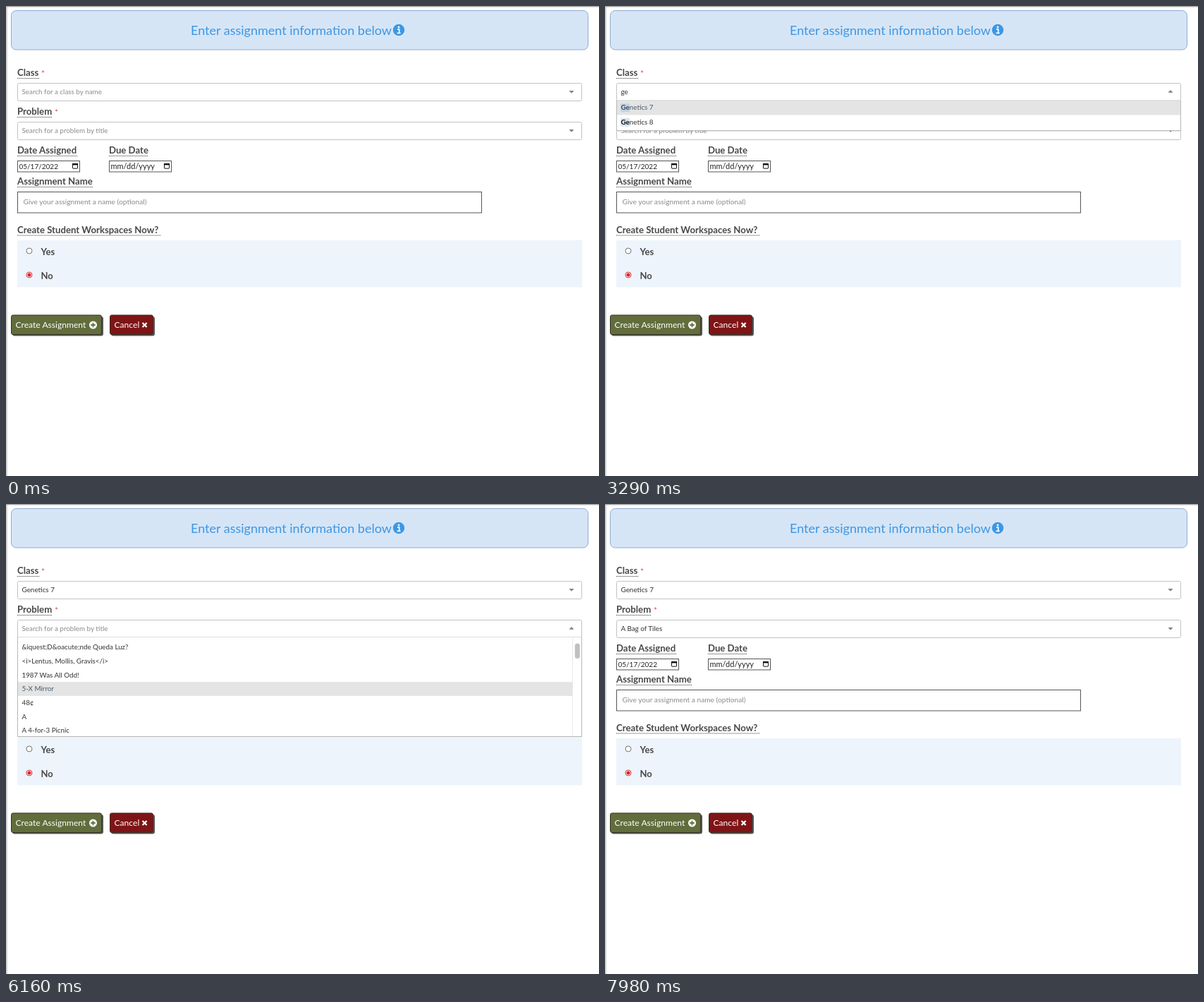
Write an HTML page that moves like this. It is 841 by 666 pixels and loops after 8000 ms.

```html
<!DOCTYPE html>
<html lang="en">
<head>
<meta charset="utf-8">
<title>Assignment form</title>
<style>
  html, body { margin: 0; width: 100%; height: 100%; overflow: hidden; background: #fff; }
  svg { display: block; }
  text { font-family: Lato, "Open Sans", sans-serif; white-space: pre; }
</style>
</head>
<body>
<svg id="stage" width="100%" height="100%" viewBox="0 0 841 666">
  <defs>
    <linearGradient id="top" x2="0" y2="1">
      <stop stop-color="#777"/><stop offset="1" stop-color="#fff" stop-opacity="0"/>
    </linearGradient>
    <linearGradient id="side">
      <stop stop-color="#b4b4b4"/><stop offset="1" stop-color="#fff" stop-opacity="0"/>
    </linearGradient>
  </defs>
  <g id="form"></g>
  <g id="live"></g>
</svg>
<script>
const LOOP = 8000, ROW = 19.65;
const INK = '#333', LABEL = '#484848', HINT = '#8a8a8a', BLUE = '#3c97e4';
const form = document.getElementById('form'), live = document.getElementById('live');

const classes = ['rwolden test group 2', 'Sunny Room', 'MKLR 268B', 'MKLR 268 2016/17',
  '7th', 'PVOL 724 2017', 'LenMarbury DEMO'];
const matches = ['Genetics 7', 'Genetics 8'];
const problems = ["What's Underneath?", "'Zip' Lantern", '&iquest;D&oacute;nde Queda Luz?',
  '<i>Lentus, Mollis, Gravis</i>', '1987 Was All Odd!', '5-X Mirror', '48¢', 'A',
  'A 4-for-3 Picnic', 'A Basket of Beads', 'A Bin Full of Painted Sand', 'A Bag of Tiles',
  "A Gardener's Bisection", 'A Chilly Morning Walk', 'A Square Balanced on an Uneven Hexagon',
  'A Crate of Silver Apples', 'A Comparison Table', 'A Comparison Table'];

const esc = s => s.replace(/&/g, '&amp;').replace(/</g, '&lt;');
const text = (x, y, s, size, fill, weight = 400) =>
  `<text x="${x}" y="${y}" font-size="${size}" fill="${fill}" font-weight="${weight}">${esc(s)}</text>`;
const rect = (x, y, w, h, fill, stroke = 'none', r = 0) =>
  `<rect x="${x}" y="${y}" width="${w}" height="${h}" fill="${fill}" stroke="${stroke}" rx="${r}"/>`;
const path = (d, stroke, width = 1, fill = 'none') =>
  `<path d="${d}" stroke="${stroke}" stroke-width="${width}" fill="${fill}"/>`;
const circle = (x, y, r, fill, stroke = 'none') =>
  `<circle cx="${x}" cy="${y}" r="${r}" fill="${fill}" stroke="${stroke}"/>`;

function label(x, y, s, width, required) {
  return text(x, y, s, 13.2, LABEL, 700) +
    `<path d="M${x} ${y + 3.5}h${width}" stroke="#333" stroke-dasharray="1 1"/>` +
    (required ? text(x + width + 3, y + 1, '*', 12, '#dc4a4a') : '');
}

function dateBox(x, s, size) {
  return rect(x + .5, 219.5, 88, 15.5, '#fff', '#555') + text(x + 2.5, 231, s, size, '#222') +
    rect(x + 78.5, 223.8, 7, 6.4, '#fff', '#111', .5) + rect(x + 78, 223, 8, 2.4, '#111');
}

function button(x, w, s, fill) {
  return rect(x + 2, 440, w, 27.5, '#555', 'none', 3) +
    rect(x + .5, 438, w - 1, 27.5, fill, '#3a3226', 2.5) + text(x + 6.5, 456.3, s, 12.1, '#fff');
}

form.innerHTML =
  rect(0, 0, 841, 666, '#fff') +
  rect(0, 0, 4, 666, 'url(#side)') + rect(0, 0, 841, 3, 'url(#top)') +
  rect(7.5, 6.5, 818, 55.5, '#d6e5f6', '#8dadd0', 7) +
  text(262, 40.6, 'Enter assignment information below', 18, BLUE) +
  circle(557, 34, 8.2, BLUE) + circle(557, 30, 1.4, '#fff') +
  path('M555 33.2h2.7v5M554.6 38.4h5', '#fff', 1.7) +
  label(16, 99, 'Class', 31, true) + label(16, 154, 'Problem', 50, true) +
  label(16, 209, 'Date Assigned', 85) + label(146, 209, 'Due Date', 56) +
  dateBox(16, '05/17/2022', 10) + dateBox(146, 'mm/dd/yyyy', 11) +
  label(16, 253, 'Assignment Name', 108) +
  rect(16.5, 263.5, 658, 29.5, '#fff', '#555') +
  text(24.5, 281.3, 'Give your assignment a name (optional)', 10.2, HINT) +
  label(16, 321.5, 'Create Student Workspaces Now?', 204) +
  rect(16, 332, 801, 66.5, '#edf4fb') +
  circle(33, 347, 4, '#fff', '#767676') + text(49.5, 353.3, 'Yes', 13, LABEL, 700) +
  circle(33, 381, 4, '#fff', '#d8323c') + circle(33, 381, 2.5, '#d8222c') +
  text(49.5, 386.8, 'No', 13, LABEL, 700) +
  button(7, 129, 'Create Assignment', '#626d3c') +
  circle(123.5, 452, 5.5, '#fff') + path('M120.3 452h6.4M123.5 448.8v6.4', '#626d3c', 1.8) +
  button(147, 62, 'Cancel', '#7f1416') +
  path('M193.6 449l6 6M199.6 449l-6 6', '#fff', 2.3);

// Closed or open select box; y is its top edge.
function field(y, value, hint, open) {
  const m = y + 12.5;
  const arrow = open ? `M798.5 ${m + 1.2}h7l-3.5 -3.6z` : `M798.5 ${m - 1.5}h7l-3.5 3.7z`;
  return rect(16.5, y + .5, 800, 25, '#fff', '#c2c2c2', 2) +
    text(22.5, m + 3, value || hint, 9.9, value ? INK : HINT) + path(arrow, 'none', 0, '#808080');
}

const caret = (x, y) => rect(x, y, 1, 11, '#111');

function option(s, y, active, bold) {
  const fill = active ? '#495c68' : INK;
  if (!bold) return text(6.5, y, s, 9.8, fill);
  return rect(6.2, y - 9.3, 13, 12, 'rgba(125,168,208,.3)', 'none', 1) +
    `<text x="6.5" y="${y}" font-size="9.8" fill="${fill}"><tspan font-weight="700" fill="${
      active ? '#3c4c66' : '#111'}">${s.slice(0, bold)}</tspan>${s.slice(bold)}</text>`;
}

// Drop-down list; thumb is [top, height] of the scroll handle, if there is one.
function list({ top, bottom, items, row = ROW, scroll = 0, hover, thumb, bold }) {
  const h = bottom - top;
  const rows = items.map((s, i) => {
    const y = i * row - scroll, active = i === hover;
    return (active ? rect(0, y, thumb ? 787 : 800, row, '#e4e4e4') : '') +
      option(s, y + row / 2 + 3.2, active, bold);
  }).join('');
  return rect(16.5, top + 1, 800, h + 1, 'rgba(0,0,0,.07)', 'none', 2) +
    rect(16.5, top, 800, h, '#fff', '#c2c2c2') +
    `<svg x="16" y="${top}" width="800" height="${h}">${rows}</svg>` +
    path(`M16.5 ${top}V${bottom}H816.5V${top}`, '#b8b8b8') +
    path(`M17 ${top}H816`, '#dcdcdc') +
    (thumb ? path(`M803.5 ${top + 1}V${bottom - 1}`, '#e8e8e8') +
      rect(806.8, thumb[0], 7, thumb[1], '#c1c1c1', 'none', 3.5) : '');
}

// Latest value whose time has come.
const at = (t, steps) => steps.reduce((v, [time, next]) => t >= time ? next : v, undefined);
const within = (t, ...spans) => spans.some(([a, b]) => t >= a && t < b);

function classPart(t) {
  const open = within(t, [1960, 3780]);
  const typed = at(t, [[0, ''], [2590, 'g'], [2800, 'ge'], [3780, matches[0]]]);
  let out = field(109, typed, 'Search for a class by name', open);
  if (!open) return out;
  out += t < 2800
    ? list({ top: 134, bottom: 275.5, items: classes, hover: 0, thumb: [137, 29] })
    : list({ top: 134, bottom: 176.5, items: matches, row: 20.5, bold: 2,
        hover: within(t, [3150, 3290]) ? 1 : 0 });
  if (within(t, [1960, 2450], [2590, 3290]))
    out += caret([23, 28, 33.5][typed.length], 116);
  return out;
}

function problemPart(t) {
  const open = within(t, [4340, 7420]);
  let out = field(164, t < 7420 ? '' : problems[11], 'Search for a problem by title', open);
  if (!open) return out;
  const step = Math.floor((t - 5880) / 70);
  const scroll = t < 5950 ? 0 : t < 6230 ? 34.5 * (step / 4) ** 2 : 202;
  const pointer = at(t, [[0, 198], [5250, 217], [5950, 265], [6580, 250], [6790, 232], [7280, 212]]);
  out += list({ top: 188.5, bottom: 329.5, items: problems, scroll,
    hover: Math.floor((pointer - 188.5 + scroll) / ROW), thumb: [191.5 + scroll * .173, 21.5] });
  if (within(t, [4340, 4900], [5390, 5950], [6440, 7000])) out += caret(23, 171);
  return out;
}

let shown = '';
function frame(now) {
  const t = now % LOOP;
  const a = classPart(t), b = problemPart(t);
  const next = t < 3780 ? b + a : a + b;
  if (next !== shown) live.innerHTML = shown = next;
  requestAnimationFrame(frame);
}
frame(performance.now());
</script>
</body>
</html>
```
